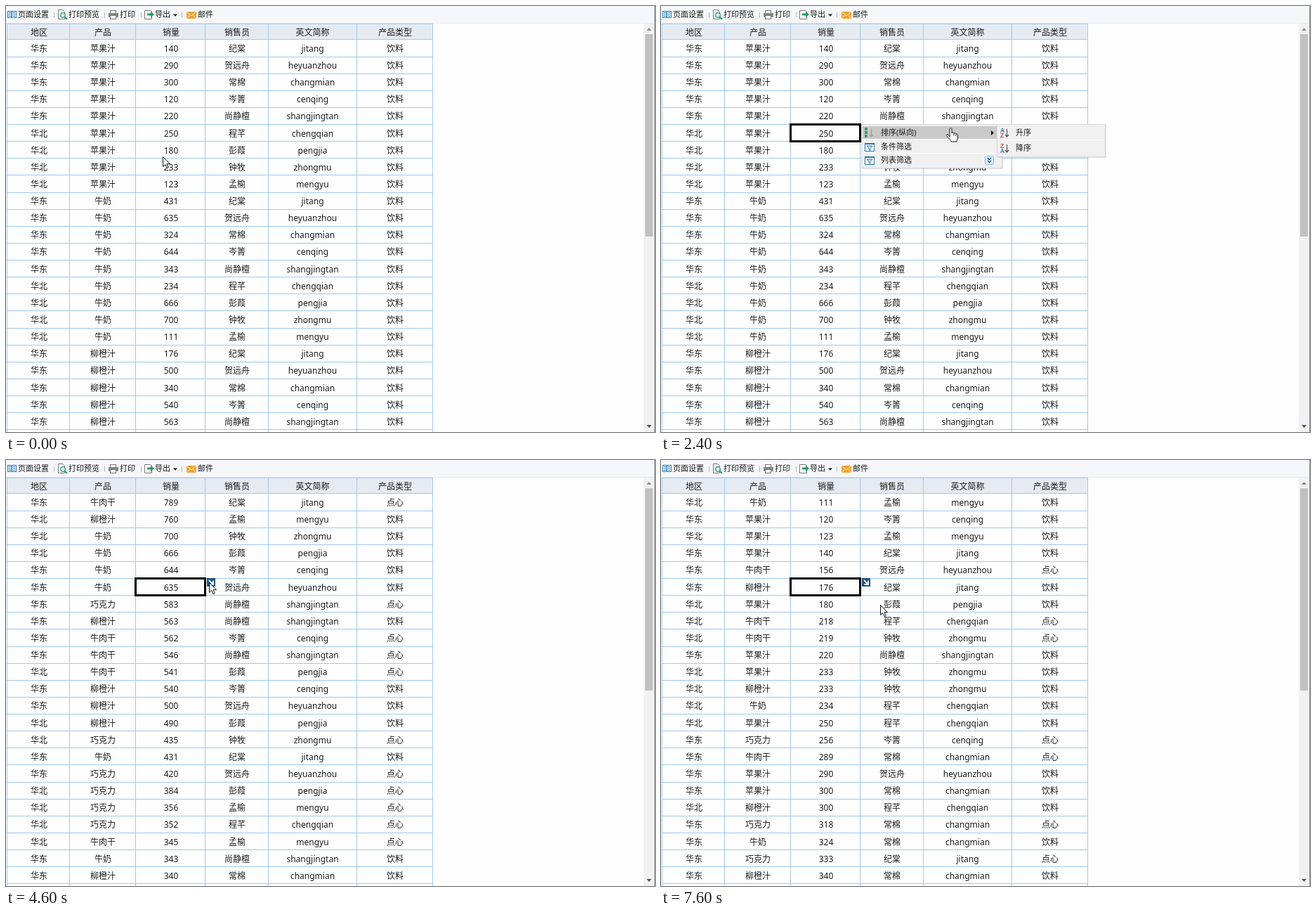
Recreate the animation shown at these times as an HTML page. Size 924 px wide and 606 px high, loop 7800 ms.

```html
<!DOCTYPE html>
<html lang="zh-CN">
<head>
<meta charset="utf-8">
<title>报表排序</title>
<style>
html, body { margin: 0; width: 100%; height: 100%; overflow: hidden; background: #fefefe; }
svg { display: block; width: 924px; height: 606px; }
text { font: 12px "Noto Sans", "Noto Sans CJK SC", "Noto Sans CJK", sans-serif; fill: #1c1c1c; }
.cell { text-anchor: middle; }
.small { font-size: 11px; }
.letter { font: bold 8.5px "Liberation Sans", sans-serif; }
</style>
</head>
<body>
<svg id="stage" viewBox="0 0 924 606"></svg>
<script>
const LOOP = 7800, TICK = 200, ROWS = 23, PITCH = 24.13;
const stage = document.getElementById('stage');

function add(parent, tag, attrs, text) {
  const node = document.createElementNS('http://www.w3.org/2000/svg', tag);
  for (const key in attrs) node.setAttribute(key, attrs[key]);
  if (text !== undefined) node.textContent = text;
  parent.appendChild(node);
  return node;
}
const group = () => add(stage, 'g', {});
const rect = (parent, x, y, width, height, fill, more) =>
  add(parent, 'rect', { x, y, width, height, fill, ...more });
const path = (parent, d, stroke, fill = 'none', more) =>
  add(parent, 'path', { d, stroke, fill, ...more });
const label = (parent, x, y, text, cls = 'small') =>
  add(parent, 'text', { x, y, class: cls }, text);
const show = (node, on) => node.setAttribute('visibility', on ? 'visible' : 'hidden');

// Data: nine sellers for each product
const sellers = [
  ['纪棠', 'jitang'], ['贺远舟', 'heyuanzhou'], ['常棉', 'changmian'],
  ['岑箐', 'cenqing'], ['尚静檀', 'shangjingtan'], ['程芊', 'chengqian'],
  ['彭葭', 'pengjia'], ['钟牧', 'zhongmu'], ['孟榆', 'mengyu']
];
const sales = {
  苹果汁: [140, 290, 300, 120, 220, 250, 180, 233, 123],
  牛奶: [431, 635, 324, 644, 343, 234, 666, 700, 111],
  柳橙汁: [176, 500, 340, 540, 563, 300, 490, 233, 760],
  巧克力: [333, 420, 318, 256, 583, 352, 384, 435, 356],
  牛肉干: [789, 156, 289, 562, 546, 218, 541, 219, 345]
};
const records = Object.entries(sales).flatMap(([product, amounts]) =>
  amounts.map((amount, i) => [
    i < 5 ? '华东' : '华北', product, amount, ...sellers[i],
    /巧|肉/.test(product) ? '点心' : '饮料'
  ]));
const orders = {
  none: records,
  down: [...records].sort((a, b) => b[2] - a[2]),
  up: [...records].sort((a, b) => a[2] - b[2])
};

function drawToolbar() {
  rect(stage, 0, 0, 924, 24, '#f6f7fa');
  rect(stage, 0, 24, 924, 1, '#e3e7ed');
  [[17, '页面设置'], [89, '打印预览'], [162, '打印'], [212, '导出'], [273, '邮件']]
    .forEach(([x, text]) => label(stage, x, 16, text));
  [68, 140, 192, 250].forEach(x => rect(stage, x, 9, 1, 8, '#b4b7bc'));

  rect(stage, 2.5, 7.5, 12, 9, '#e9f4fc', { stroke: '#2e7bb5' });
  path(stage, 'M4 9.5h4M4 12h4M4 14.5h4M10 9.5h3M10 12h3M10 14.5h3', '#2e7bb5');
  path(stage, 'M8.5 7v10', '#2e7bb5');

  path(stage, 'M74.5 5.5h6l3 3v10h-9z', '#777', '#fff');
  add(stage, 'circle', { cx: 81, cy: 13, r: 3.3, fill: '#d8f3e8', stroke: '#2c9a78', 'stroke-width': 1.3 });
  path(stage, 'M83.5 15.5l3.5 3.5', '#2c9a78', 'none', { 'stroke-width': 2 });

  rect(stage, 148.5, 6.5, 8, 5, '#fff', { stroke: '#777' });
  rect(stage, 146, 10, 14, 6, '#858585', { rx: 1 });
  rect(stage, 148.5, 13.5, 8, 5, '#fff', { stroke: '#777' });

  path(stage, 'M197.5 6.5h8l2 2v10h-10z', '#777', '#fff');
  path(stage, 'M201 10.5h5v-3l5 4.500-5 4.500v-3h-5z', 'none', '#2e9a62');
  path(stage, 'M238 11.5h6l-3 3.5z', 'none', '#222');

  rect(stage, 257, 8, 14, 10, '#f0a32f', { rx: 1 });
  path(stage, 'M257.5 8.5l6.5 5.5 6.5-5.5M257.5 17.5l4.5-5M270.5 17.5l-4.5-5', '#fff3d8');
}

function drawScrollbar() {
  rect(stage, 908, 25, 15, 581, '#f1f1f3');
  rect(stage, 910, 40, 11, 288, '#c1c1c1');
  path(stage, 'M912 35h7l-3.5-4z', 'none', '#8b8b8b');
  path(stage, 'M912 596h7l-3.5 4z', 'none', '#505050');
  rect(stage, 923, 0, 1, 606, '#8c9094');
}

const rowTop = i => Math.round(47.4 + PITCH * i);
const centers = [47, 138, 235, 329, 436.5, 554];

function drawTable() {
  rect(stage, 1, 25, 606, 23, '#e6ebf1');
  const xs = [1, 90, 184, 283, 373, 499, 607];
  const ys = [25, ...Array.from({ length: ROWS + 1 }, (_, i) => rowTop(i))];
  const d = xs.map(x => `M${x + .5} 25V606`).join('') + ys.map(y => `M1 ${y + .5}H607.5`).join('');
  path(stage, d, '#a0c8ec');
  ['地区', '产品', '销量', '销售员', '英文简称', '产品类型']
    .forEach((text, c) => label(stage, centers[c], 42, text, 'cell'));
  return Array.from({ length: ROWS }, (_, r) => centers.map(x =>
    label(stage, x, Math.round(64.9 + PITCH * r), '', 'cell')));
}

function drawBadge() {
  const g = group();
  rect(g, 286, 168, 12, 12, '#1f5285');
  path(g, 'M289 171l5 5M295 171.5v5.5h-5.5', '#fff', 'none', { 'stroke-width': 1.8 });
  return g;
}

function panel(g, x, y, w, h) {
  rect(g, x + 1, y + 1, w, h, '#000', { opacity: .1 });
  rect(g, x + .5, y + .5, w - 1, h - 1, '#f0f0f0', { stroke: '#d6d6d6' });
}

function drawMenu() {
  const g = group();
  panel(g, 285, 168, 201, 63);
  rect(g, 287, 189, 197, 1, '#fff');
  rect(g, 287, 209, 197, 1, '#fff');
  const hover = rect(g, 287, 171, 193, 18, '#c9c9c9');
  [['排序(纵向)', 184], ['条件筛选', 204], ['列表筛选', 223]]
    .forEach(([text, y]) => label(g, 313, y, text));
  [173, 178, 183].forEach(y => rect(g, 290, y, 4, 4, '#3c9c6b'));
  path(g, 'M299.5 174v12M297 183l2.5 3 2.5-3', '#a2a2a2', 'none', { 'stroke-width': 1.5 });
  [195, 214].forEach(y => {
    rect(g, 290.5, y + .5, 13, 11, '#fff', { stroke: '#2e76ad' });
    rect(g, 290, y, 14, 2, '#2e76ad');
    path(g, `M293 ${y + 4}h8l-3 3.5v3l-2-1.5v-1.5z`, '#2e76ad', '#d8ebf8');
  });
  path(g, 'M470 177l4 3.5-4 3.5z', 'none', '#111');
  rect(g, 461.5, 213.5, 12, 12, '#d9ecfb', { stroke: '#8bb9dc', rx: 2 });
  path(g, 'M465 216l2.5 2.5 2.5-2.5M465 220l2.5 2.5 2.5-2.5', '#1c4f80', 'none', { 'stroke-width': 1.4 });
  return { g, hover };
}

function drawSubmenu() {
  const g = group();
  panel(g, 478, 168, 155, 47);
  rect(g, 480, 190, 151, 1, '#fff');
  const hovers = [171, 192].map(y => rect(g, 482, y, 148, 19, '#c9c9c9'));
  const letters = [['A', '#2f6aa5'], ['Z', '#c2503f']];
  ['升序', '降序'].forEach((text, i) => {
    const y = 180 + 22 * i;
    label(g, 505, y + 4, text);
    const pair = i ? [letters[1], letters[0]] : letters;
    pair.forEach(([char, color], k) => {
      label(g, 483, y + 7 * k, char, 'letter').style.fill = color;
    });
    path(g, `M492.5 ${y - 5}v11M490 ${y + 3}l2.5 3 2.5-3`, '#555', 'none', { 'stroke-width': 1.2 });
  });
  return { g, hovers };
}

drawToolbar();
drawScrollbar();
const cells = drawTable();
const selection = rect(stage, 184.5, 168.5, 99, 24, 'none', { stroke: '#000', 'stroke-width': 3 });
const badge = drawBadge();
const menu = drawMenu();
const submenu = drawSubmenu();
const pointer = group();
const arrow = path(pointer, 'M.5.5v14l3.3-3 2.3 5.2 2.2-1-2.3-5h4.5z', '#111', '#fff');
const hand = path(pointer,
  'M-2 13V2C-2 0 1 0 1 2V8C1 6.5 4 6.5 4 8.5C4 7.3 7 7.3 7 9.5C7 8.5 9.5 8.8 9.5 10.5V14' +
  'C9.5 17 8 18 8 20H0C0 18-3 16-6 11.5C-7 9.5-5 9-4 10.5ZM4 8.5v3M7 9.5v2.5', '#111', '#fff');

// Pointer stops: time, x, y
const stops = [
  [0, 223, 214], [600, 245, 192], [1000, 257, 182], [1200, 264, 181], [1600, 290, 175],
  [2000, 345, 176], [2400, 413, 173], [2800, 495, 192], [3000, 507, 200], [3400, 507, 213],
  [3800, 470, 211], [4400, 304, 178], [4600, 289, 174], [4800, 289, 174], [5200, 400, 180],
  [5600, 502, 183], [6200, 508, 183], [6800, 330, 204], [7000, 330, 204], [7600, 312, 206], [LOOP, 312, 206]
];
function pointerAt(t) {
  const i = stops.findIndex(s => s[0] > t);
  const [a, b] = [stops[i - 1], stops[i]];
  const k = (t - a[0]) / (b[0] - a[0]);
  return [a[1] + (b[1] - a[1]) * k, a[2] + (b[2] - a[2]) * k];
}

const within = (t, from, to) => t >= from && t < to;
let shownOrder;
function fillTable(order) {
  if (order === shownOrder) return;
  shownOrder = order;
  cells.forEach((row, r) => row.forEach((cell, c) => { cell.textContent = orders[order][r][c]; }));
}

function render(t) {
  const [x, y] = pointerAt(t);
  const menuOpen = within(t, 1600, 3200) || within(t, 4800, 6200);
  const subOpen = within(t, 2000, 3200) || within(t, 5000, 6200);
  const selected = t >= 800;
  fillTable(t < 3200 ? 'none' : t < 6200 ? 'down' : 'up');
  show(selection, selected);
  show(badge, selected && !menuOpen);
  show(menu.g, menuOpen);
  show(menu.hover, subOpen);
  show(submenu.g, subOpen);
  submenu.hovers.forEach((bar, i) => show(bar, subOpen && x > 480 && (y > 190) === (i === 1)));
  show(hand, subOpen);
  show(arrow, !subOpen);
  pointer.setAttribute('transform', `translate(${Math.round(x)} ${Math.round(y)})`);
}

function frame() {
  const t = performance.now() % LOOP;
  render(Math.floor(t / TICK) * TICK);
  requestAnimationFrame(frame);
}
frame();
</script>
</body>
</html>
```
